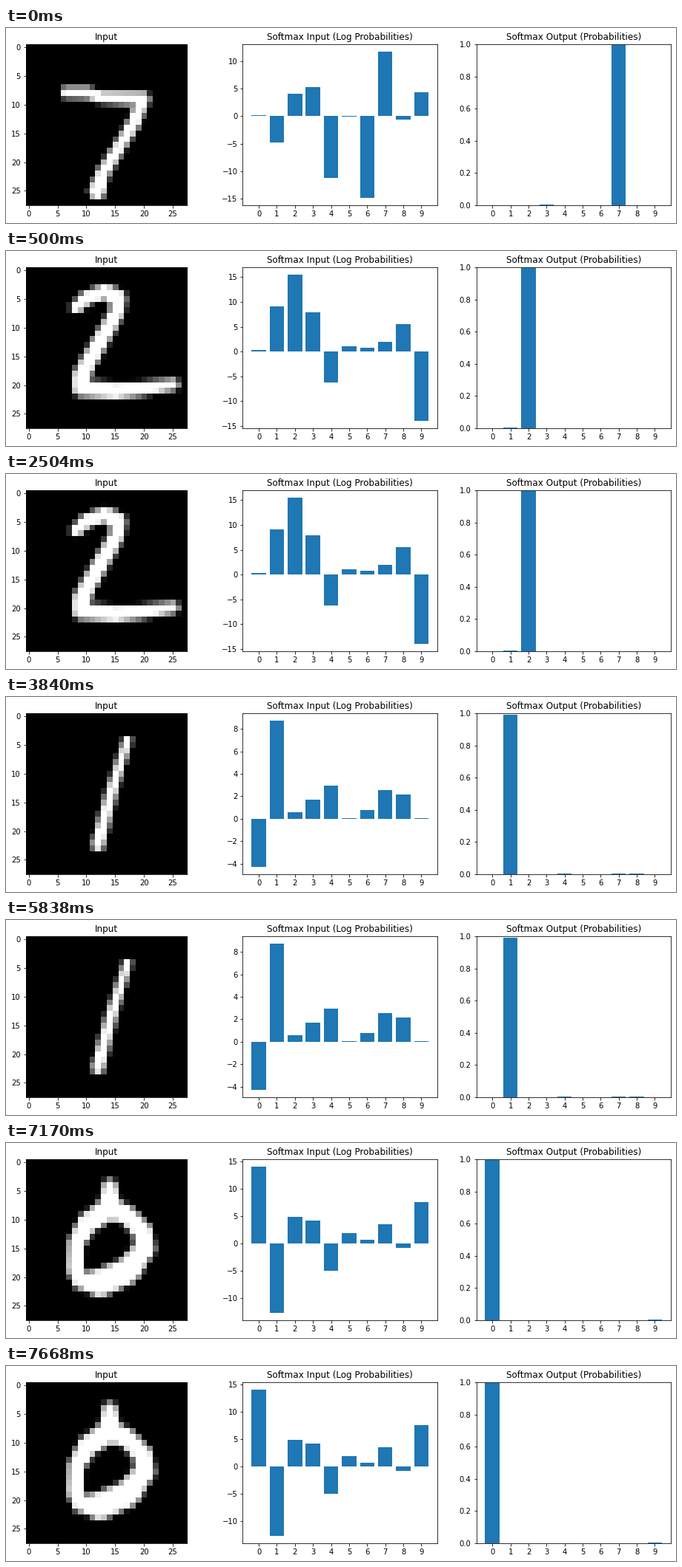
A matplotlib script for the animation above (8 s loop, 904 px wide and 264 px high).

```python
import numpy as np
import matplotlib.pyplot as plt
from matplotlib.animation import FuncAnimation

W, H, DPI = 904, 264, 72
LOOP, STEP = 8000, 40
STARTS = [0, 500, 3840, 7170]
GRID = 28

# Pen strokes: key points as (x, y, pen radius) in cells, y pointing down
SEVEN = [(6.5, 7.9, 0.95), (10, 7.95, 1), (12.5, 8.7, 1), (19.8, 9, 1.2),
         (18.3, 13, 1.1), (12.8, 22, 1.1), (11.8, 25, 1.5)]
TWO = [(8.3, 6.5, 1.05), (10, 4.8, 1.2), (13.3, 3.75, 1.3), (15.4, 4.9, 1.5),
       (15.3, 7.2, 1.3), (10.3, 16, 1.45), (9.1, 18.5, 1.5), (9.1, 20.5, 1.5),
       (15, 21, 1.45), (19, 20.7, 1.25), (25, 19.9, 1.05)]
ONE = [(17.05, 4.3, 0.8), (14.2, 13.5, 0.95), (12, 22.3, 1.1)]
ZERO = [(14, 4.2, 1.2), (14, 8, 2), (10.2, 10.6, 1.8), (8.2, 14, 1.35),
        (8.1, 18.5, 1.4), (9, 20.6, 1.5), (12.3, 21, 2.4), (17, 19, 2.3),
        (20.1, 15, 1.8), (19.7, 12, 1.7), (17, 9.2, 1.6), (14, 8, 2)]

LOGITS = np.array([
    [0.15, -4.75, 4.05, 5.25, -11.2, -0.1, -14.8, 11.65, -0.65, 4.3],
    [0.25, 9.05, 15.45, 7.85, -6.2, 1.0, 0.7, 1.9, 5.5, -13.95],
    [-4.28, 8.72, 0.6, 1.7, 2.95, 0.07, 0.8, 2.55, 2.15, 0.05],
    [14.05, -12.65, 4.85, 4.2, -5.0, 1.9, 0.7, 3.5, -0.8, 7.55],
])


def draw_digit(stroke):
    """Brightness of each cell under a soft pen moved along the stroke."""
    y, x = np.mgrid[:GRID, :GRID]
    ink = np.zeros((GRID, GRID))
    for (x0, y0, r0), (x1, y1, r1) in zip(stroke, stroke[1:]):
        dx, dy = x1 - x0, y1 - y0
        s = ((x - x0) * dx + (y - y0) * dy) / (dx * dx + dy * dy)
        s = np.clip(s, 0, 1)
        dist = np.hypot(x - x0 - s * dx, y - y0 - s * dy)
        ink = np.maximum(ink, r0 + s * (r1 - r0) - dist + 0.5)
    return np.clip(ink, 0, 1)


def softmax(z):
    e = np.exp(z - z.max())
    return e / e.sum()


DIGITS = [draw_digit(s) for s in (SEVEN, TWO, ONE, ZERO)]

plt.rcParams.update({"font.family": "DejaVu Sans", "font.size": 10})
fig = plt.figure(figsize=(W / DPI, H / DPI), dpi=DPI, facecolor="white")
SIDE, BAR_W, LEFT, BOTTOM = 217.44, 262.59, 4.345, 24.2


def panel(x, w, title):
    ax = fig.add_axes([x / W, BOTTOM / H, w / W, SIDE / H])
    ax.set_title(title, fontsize=12)
    return ax


def bar_panel(col, title):
    ax = panel(LEFT + col * 1.2 * BAR_W, BAR_W, title)
    bars = ax.bar(range(10), np.ones(10), color="tab:blue")
    ax.set_xticks(range(10))
    ax.set_xlim(-0.89, 9.89)
    return ax, bars


ax_in = panel(LEFT + (BAR_W - SIDE) / 2, SIDE, "Input")
image = ax_in.imshow(DIGITS[0], cmap="gray", vmin=0, vmax=1)
ax_in.set_xticks(range(0, GRID, 5))
ax_in.set_yticks(range(0, GRID, 5))
ax_log, log_bars = bar_panel(1, "Softmax Input (Log Probabilities)")
ax_prob, prob_bars = bar_panel(2, "Softmax Output (Probabilities)")
ax_prob.set_ylim(0, 1)


def set_heights(bars, values):
    for bar, v in zip(bars, values):
        bar.set_height(v)


def update(i):
    # Each change lands on the nearest tick
    k = np.searchsorted(STARTS, i * STEP + STEP / 2, side="right") - 1
    z = LOGITS[k]
    image.set_data(DIGITS[k])
    set_heights(log_bars, z)
    set_heights(prob_bars, softmax(z))
    pad = 0.05 * np.ptp(z)
    ax_log.set_ylim(z.min() - pad, z.max() + pad)
    return [image, *log_bars, *prob_bars]


anim = FuncAnimation(fig, update, frames=LOOP // STEP, interval=STEP,
                     repeat=True, repeat_delay=0, blit=False)
plt.show()
```
